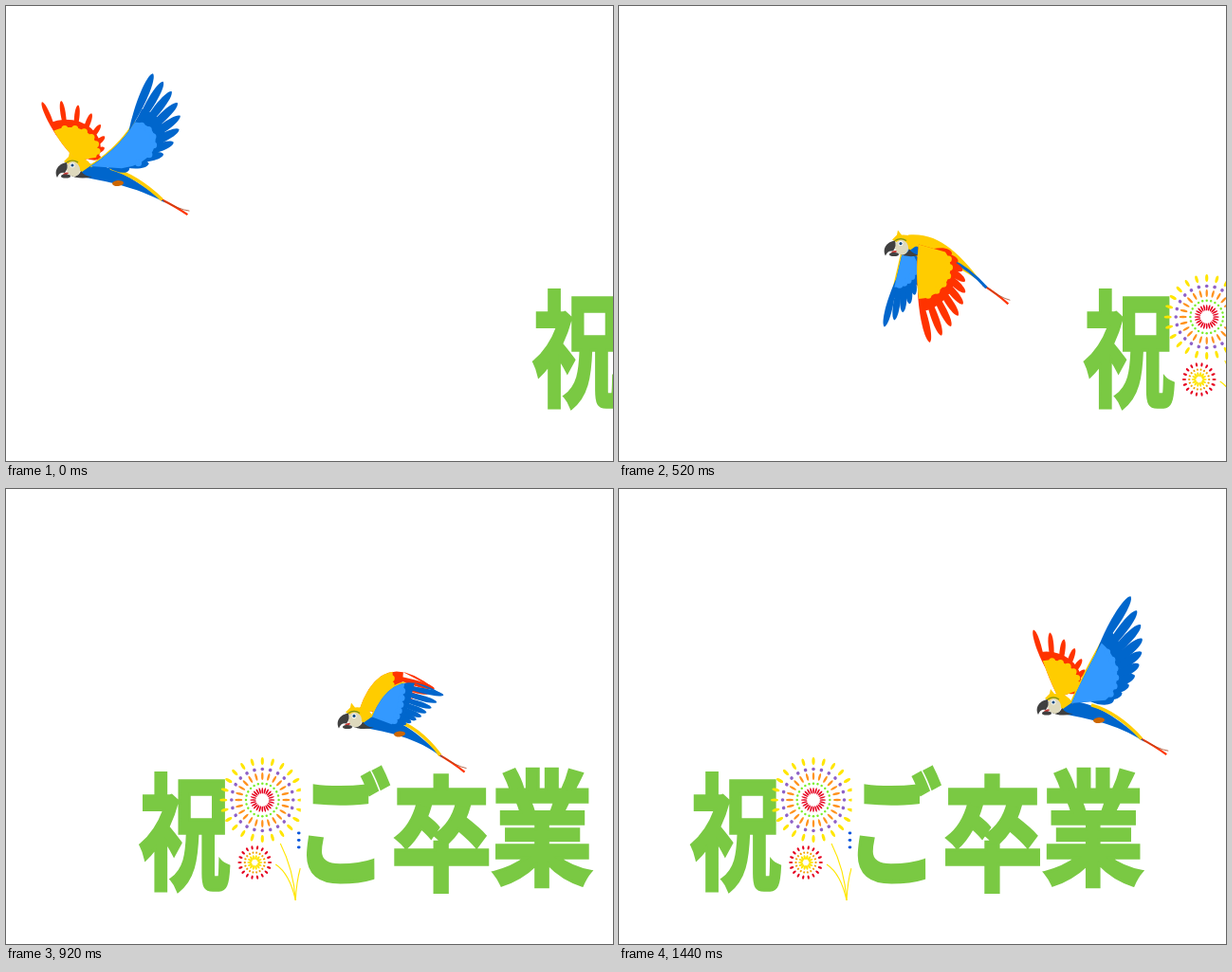
Write an HTML page with a canvas that moves like this. It is 640 px wide and 480 px high and loops after 1480 ms.

```html
<!DOCTYPE html>
<html lang="ja">
<head>
<meta charset="utf-8">
<style>
html, body { margin: 0; width: 100%; height: 100%; overflow: hidden; background: #fff; }
svg, canvas { position: absolute; left: 0; top: 0; width: 640px; height: 480px; }
text {
  font: 700 131px "Noto Sans CJK JP", "Noto Sans CJK", sans-serif;
  text-anchor: middle; fill: #7ac943; stroke: #7ac943; stroke-width: 3.5px;
}
</style>
</head>
<body>
<svg viewBox="0 0 640 480">
  <g id="title">
    <text transform="translate(123 411) scale(.73 1)">祝</text>
    <text transform="translate(290 407) scale(.76 1)">ご</text>
    <text transform="translate(394 413) scale(.82 1)">卒</text>
    <text transform="translate(500 407) scale(.82 1)">業</text>
  </g>
</svg>
<canvas id="stage" width="640" height="480"></canvas>
<script>
const LOOP = 1480, STEP = 40, FLAP = 1200, TRAVEL = 1440;
const RED = '#ff3300', YELLOW = '#ffcc00', BLUE = '#0066cc', SKY = '#3399ff', DARK = '#404040';
const title = document.getElementById('title');
const c = document.getElementById('stage').getContext('2d');

// Flap keys by time: angle, reach, spread, bow and fullness of the feather fan.
const near = {
  0: [-56, 118, 60, 13, 2.6],
  240: [-61, 129, 56, -3, 1],
  360: [77, 110, -59, 17, 1.4],
  680: [90, 98, -76, -4, 1],
  840: [-7, 50, 40, -22, 1],
  1040: [-32, 122, 34, -28, .5],
  1120: [-57, 132, 50, -6, 1.3]
};
const far = {
  0: [-121, 72, 112, -5],
  240: [-110, 76, 90, -2],
  360: [112, 102, -40, -8],
  680: [95, 89, -40, 7],
  840: [7, 85, 5, -38],
  1040: [-52, 81, 35, -18]
};

const mix = (a, b, u) => a.map((v, i) => v + (b[i] - v) * u);

function pose(keys, phase) {
  const times = Object.keys(keys).map(Number);
  const from = times.filter(t => t <= phase).pop();
  const to = times.find(t => t > phase) || FLAP;
  return mix(keys[from], keys[to % FLAP], (phase - from) / (to - from));
}

function shape(color, draw) {
  c.fillStyle = color;
  c.beginPath();
  draw();
  c.fill();
}

function line(color, width, draw) {
  c.strokeStyle = color;
  c.lineWidth = width;
  c.beginPath();
  draw();
  c.stroke();
}

function oval(color, x, y, rx, ry = rx, turn = 0) {
  shape(color, () => c.ellipse(x, y, rx, ry, turn, 0, 7));
}

function feather(from, to, w) {
  const dx = to[0] - from[0], dy = to[1] - from[1], len = Math.hypot(dx, dy) || 1;
  const at = (k, s) => [from[0] + dx * k - dy / len * w * s, from[1] + dy * k + dx / len * w * s];
  c.moveTo(...from);
  c.bezierCurveTo(...at(.45, 1), ...at(.95, 1), ...to);
  c.bezierCurveTo(...at(.95, -1), ...at(.45, -1), ...from);
}

function wing([x, y], [angle, reach, spread, bow, full = 1], outer, inner, count) {
  const rad = Math.PI / 180;
  // u runs from the leading to the trailing feather, k from shoulder to tip.
  const at = (u, k) => {
    const a = (angle + spread * u) * rad, r = reach * (1 - .65 * u ** full) * k;
    const bend = bow * 4 * k * (1 - k) * (1 - u);
    return [
      x + r * Math.cos(a) - bend * Math.sin(angle * rad),
      y + r * Math.sin(a) + bend * Math.cos(angle * rad)
    ];
  };
  const arm = end => {
    c.moveTo(x, y);
    for (let i = 1; i <= 10; i++) c.lineTo(...at(0, end * i / 10));
  };
  const fan = (end, grow) => {
    for (let i = 0; i <= 12; i++) c.lineTo(...at(i / 12, end + grow * i / 12));
  };
  if (outer === BLUE) line(YELLOW, 3, () => arm(.55));
  shape(outer, () => { arm(1); fan(.68, .22); });
  for (let i = 0; i < count; i++) {
    const u = i / (count - 1);
    shape(outer, () => feather(at(u, .45), at(u, 1), reach / 20));
  }
  shape(inner, () => { arm(.55); fan(.55, .25); });
  for (let i = 1; i < 7; i++) oval(inner, ...at(i / 7, .53 + .25 * i / 7), 3.5);
}

function body(phase, down) {
  const sway = Math.cos(2 * Math.PI * (phase - STEP) / FLAP);
  const tx = 117 + 4.5 * sway, ty = 58.5 - 6.5 * sway;
  const ex = tx * .78, ey = ty * .7;
  line(RED, 2.2, () => {
    c.moveTo(ex - 2, ey - 1);
    c.quadraticCurveTo(tx * .9, ty * .84, tx, ty);
  });
  line('#a44a28', .8, () => {
    c.moveTo(ex, ey);
    c.quadraticCurveTo(tx * .93, ty * .9, tx + 2, ty - 4);
  });
  shape(down ? YELLOW : BLUE, () => {
    c.moveTo(8, down ? -9 : -2);
    c.bezierCurveTo(40, down ? -12 : -2, 62, down ? 10 : 12, ex, ey);
    c.lineTo(ex + 3, ey + 3);
    c.bezierCurveTo(66, 22, 34, 17, 10, 12);
  });
  if (down) {
    line(BLUE, 3, () => {
      c.moveTo(52, 17);
      c.quadraticCurveTo(72, 26, ex + 2, ey + 2);
    });
    oval(BLUE, 15, 8, 6, 5);
  } else {
    line(YELLOW, 3.4, () => {
      c.moveTo(40, 3);
      c.quadraticCurveTo(68, 11, ex, ey);
    });
    oval('#cc6600', 48, 19, 6, 3, -.1);
  }
}

function head() {
  shape(YELLOW, () => {
    c.moveTo(-9, -4);
    c.lineTo(-4, -9);
    c.lineTo(-3, -14);
    c.lineTo(1, -9);
    c.quadraticCurveTo(14, -10, 20, 0);
    c.lineTo(10, 7);
  });
  shape(DARK, () => {
    c.moveTo(-4, 10);
    c.quadraticCurveTo(6, 14, 9, 6);
    c.quadraticCurveTo(13, 12, 21, 12);
    c.quadraticCurveTo(8, 16, -4, 10);
  });
  oval('#ded9bd', 1, 4, 7, 8, -.3);
  shape(DARK, () => {
    c.moveTo(-6, -3);
    c.bezierCurveTo(-14, -2, -20, 5, -16, 13);
    c.quadraticCurveTo(-14, 7, -8, 8);
    c.quadraticCurveTo(-4, 3, -6, -3);
  });
  oval('#c33b36', -7, 9, 3, 1.3, -.3);
  oval(DARK, -7, 11.5, 5, 2);
  line('#75901c', 1.2, () => {
    c.moveTo(-6, -3);
    c.quadraticCurveTo(0, -7, 6, -3);
  });
  oval('#fff', 0, 0, 2.5);
  oval('#164b80', 0, 0, 1.6);
}

function bird(t) {
  const phase = t % FLAP, down = phase >= 300 && phase < 760;
  const cool = [BLUE, SKY], warm = [RED, YELLOW];
  const late = t - 360;
  c.save();
  if (late < 0) c.translate(70 + 199 * t / 360, 168 + 87 * t / 360);
  else c.translate(269 + .175 * late, 255 - .0278 * late);
  wing([5, -5], pose(far, phase), ...(down ? cool : warm), 8);
  body(phase, down);
  head();
  wing([19, 1], pose(near, phase), ...(down ? warm : cool), 10);
  c.restore();
}

// A ring of slim petals pointing outward.
function ring(x, y, count, r, length, width, color) {
  for (let i = 0; i < count; i++) {
    const a = i / count * 2 * Math.PI;
    oval(color, x + r * Math.cos(a), y + r * Math.sin(a), length / 2, width / 2, a);
  }
}

function fireworks(dx) {
  c.save();
  c.translate(dx, 0);
  c.beginPath();
  c.rect(155, 275, 90.5, 165);
  c.clip();
  ring(205, 328, 24, 41, 8, 3.2, '#ffe600');
  ring(205, 328, 24, 32.5, 3.6, 3.6, '#8e62c8');
  ring(205, 328, 24, 25, 8, 2.4, '#ff931e');
  ring(205, 328, 24, 17.3, 2.5, 2.5, '#7aee2a');
  ring(205, 328, 24, 9.8, 6.6, 1.7, '#e6001f');
  ring(197, 394, 18, 15.8, 4.4, 2.2, '#e6001f');
  ring(197, 394, 18, 10.5, 2.4, 2, '#f0a000');
  ring(197, 394, 14, 5.5, 5, 2.2, '#ffe600');
  for (let i = 0; i < 3; i++) oval('#0055dd', 243.5, 363 + 7.5 * i, 1.9, 1.4);
  const stalk = (x, y, kx, ky) => line('#ffe600', 1.1, () => {
    c.moveTo(240, 434);
    c.quadraticCurveTo(kx, ky, x, y);
  });
  stalk(224, 374, 238, 402);
  stalk(219, 396, 234, 406);
  stalk(245, 400, 241, 414);
  c.restore();
}

function frame() {
  const t = Math.floor(performance.now() % LOOP / STEP) * STEP;
  const u = t / TRAVEL;
  const eased = u < .5 ? 8 * u ** 4 : 1 - 8 * (1 - u) ** 4;
  const dx = 480 * (1 - eased);
  title.setAttribute('transform', `translate(${dx} 0)`);
  c.clearRect(0, 0, 640, 480);
  fireworks(dx);
  bird(t);
  requestAnimationFrame(frame);
}
frame();
</script>
</body>
</html>
```
